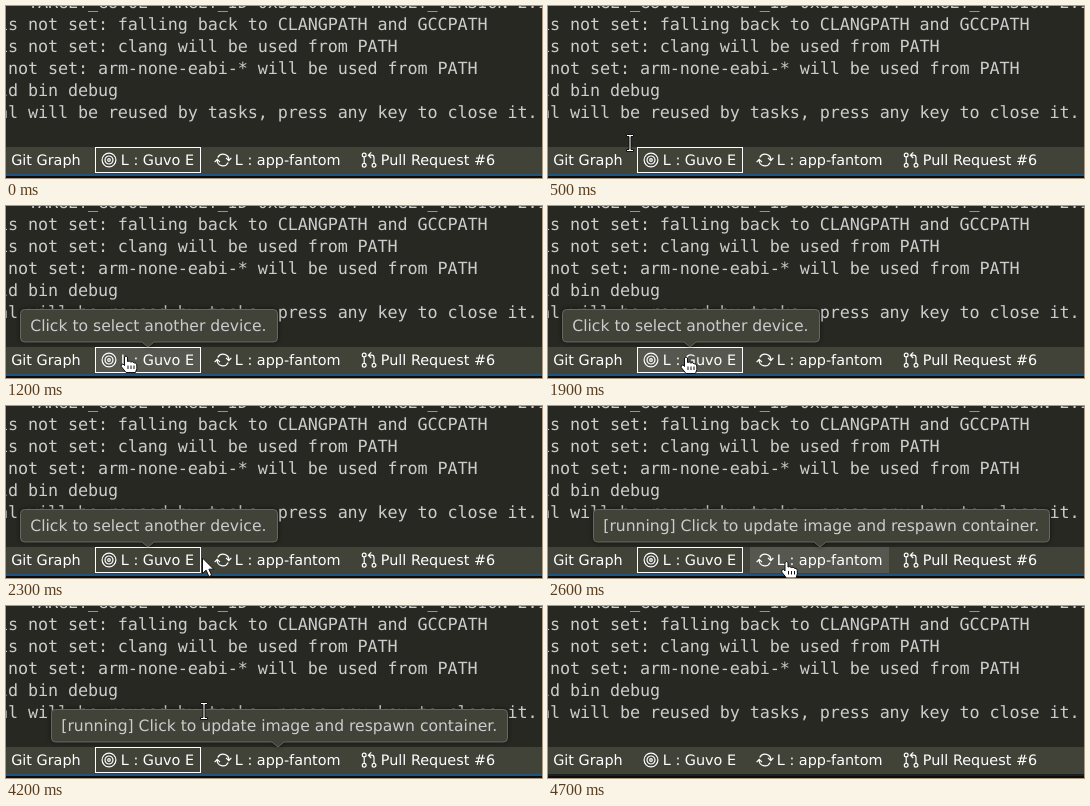
An HTML page for the animation above (5 s loop, 536 px wide and 172 px high).

```html
<!DOCTYPE html>
<html lang="en">
<head>
<meta charset="utf-8">
<title>Status bar hints</title>
<style>
html, body { margin: 0; height: 100%; overflow: hidden; background: #272822; }
svg { display: block; }
text { font: 14.4px "DejaVu Sans", sans-serif; fill: #fff; white-space: pre; text-rendering: geometricPrecision; }
#terminal text { font: 16.8px "DejaVu Sans Mono", monospace; letter-spacing: -.114px; fill: #ccc; }
.icon { fill: none; stroke: #fff; stroke-width: 1.2; }
.hover { fill: #fff; fill-opacity: .11; }
.tip { filter: drop-shadow(0 0 2px #0008); }
.tip path { fill: #414339; stroke: #66675e; }
.tip text { font-size: 15.6px; fill: #ccc; }
#cursor path { fill: #fff; stroke: #111; stroke-linejoin: round; }
</style>
</head>
<body>
<svg width="536" height="172" viewBox="0 0 536 172">
  <rect width="536" height="172" fill="#272822"/>
  <g id="terminal"></g>
  <rect y="141" width="536" height="27" fill="#414339"/>
  <rect y="168" width="536" height="4" fill="#0c0d0e"/>
  <rect id="edge" y="168" width="536" height="2"/>
  <rect id="deviceHover" class="hover" x="89" y="141" width="106" height="26"/>
  <rect id="appHover" class="hover" x="202" y="141" width="139" height="26"/>
  <rect id="focus" x="89.5" y="141.5" width="105" height="25" fill="none" stroke="#fff"/>

  <text x="5.2" y="159">Git Graph</text>
  <g class="icon" transform="translate(103 154)">
    <circle r="6.9"/><circle r="4"/><circle r="1.3"/>
  </g>
  <text x="114.8" y="159">L : Guvo E</text>
  <g class="icon" transform="translate(217 154)">
    <path id="half" d="M-5.2-2.6A5.8 5.8 0 0 1 5.8 .4M3-2.2 5.8 .6 8.4-2.2"/>
    <use href="#half" transform="rotate(180)"/>
  </g>
  <text x="228.8" y="159">L : app-fantom</text>
  <g class="icon" transform="translate(363 154)">
    <circle cx="-4.8" cy="-5" r="1.9"/><circle cx="-4.8" cy="5.2" r="1.9"/><circle cx="5" cy="5.2" r="1.9"/>
    <path d="M-4.8-3V3.2M5 3.2V-2.5Q5-4.8 2.7-4.8H-.5M2.2-7.6-.6-4.8 2.2-2"/>
  </g>
  <text x="374.8" y="159">Pull Request #6</text>

  <g id="deviceTip" class="tip"></g>
  <g id="appTip" class="tip"></g>
  <g id="cursor">
    <path id="hand" d="M-1.5 1Q0-1 1.5 1V5.5Q3.5 4.4 4.8 6 6.8 5 8 6.8 10.8 6.4 10.8 9V12.5L9.5 16.5H0L-4.8 10.5Q-5.3 7.6-3 8L-1.5 9.5ZM2 9.5V13M5 9.5V13M8 9.5V13"/>
    <path id="arrow" d="M0 0V15.5L3.6 12.2 6.4 18.6 9.2 17.3 6.4 11.2H11.2Z"/>
    <path id="beam" d="M-3.5-8.5H3.5V-6.5H1V6.5H3.5V8.5H-3.5V6.5H-1V-6.5H-3.5Z"/>
  </g>
</svg>
<script>
const $ = id => document.getElementById(id);
const show = (id, opacity) => $(id).setAttribute("opacity", +opacity);

const lines = [
  [22, "TARGET_GUVOE TARGET_ID 0x31100004 TARGET_VERSION 2.1.0"],
  [-8, "is not set: falling back to CLANGPATH and GCCPATH"],
  [-8, "is not set: clang will be used from PATH"],
  [2, "not set: arm-none-eabi-* will be used from PATH"],
  [-8, "ld bin debug"],
  [-8, "al will be reused by tasks, press any key to close it."],
];
$("terminal").innerHTML = lines.map(([x, s], i) => `<text x="${x}" y="${2 + i * 22}">${s}</text>`).join("");

// Rounded bubble with a pointer below it
function bubble(id, left, right, pointer, label) {
  $(id).innerHTML = `<path d="M${left + 4} 103.5H${right - 4}q4 0 4 4V132q0 4-4 4H${pointer + 6}l-6 5-6-5H${left + 4}q-4 0-4-4V107.5q0-4 4-4Z"/>
    <text x="${left + 9.8}" y="125">${label}</text>`;
}
bubble("deviceTip", 14.5, 271.5, 142, "Click to select another device.");
bubble("appTip", 45.5, 501.5, 272, "[running] Click to update image and respawn container.");

// Pointer path: time, x, y
const route = [
  [300, 56, 121], [500, 82, 137], [800, 120, 150],
  [1700, 120, 150], [1900, 138, 151], [2300, 196.5, 152],
  [2400, 220, 155], [2600, 238.5, 155.5], [3900, 238.5, 155.5],
  [4000, 235.5, 144.5], [4200, 198, 105], [4400, 112, 30], [4500, 83, 2], [4600, 56, -5],
];

function pointerAt(t) {
  if (t < 300 || t > 4600) return null;
  const i = Math.max(1, route.findIndex(p => p[0] >= t));
  const [t0, x0, y0] = route[i - 1], [t1, x1, y1] = route[i];
  const k = (t - t0) / (t1 - t0);
  return [x0 + (x1 - x0) * k, y0 + (y1 - y0) * k];
}

// Two-step fade in, hard cut out
const fade = (t, start, end) => t < start || t >= end ? 0 : t < start + 100 ? .5 : 1;

function draw(now) {
  const t = Math.floor(now % 5000 / 100) * 100;
  const p = pointerAt(t);
  const [x, y] = p || [-50, -50];
  const inBar = y >= 141;
  const onDevice = inBar && x >= 89 && x < 195;
  const onApp = inBar && x >= 202 && x < 341;
  const active = t < 4500;

  show("deviceHover", onDevice);
  show("appHover", onApp);
  show("focus", active);
  $("edge").setAttribute("fill", active ? "#1f5480" : "#1c1e1f");
  show("deviceTip", fade(t, 1100, 2400));
  show("appTip", fade(t, 2500, 4300));

  show("cursor", p !== null);
  $("cursor").setAttribute("transform", `translate(${x} ${y})`);
  show("hand", onDevice || onApp);
  show("arrow", inBar && !onDevice && !onApp);
  show("beam", !inBar);
  requestAnimationFrame(draw);
}
requestAnimationFrame(draw);
</script>
</body>
</html>
```
